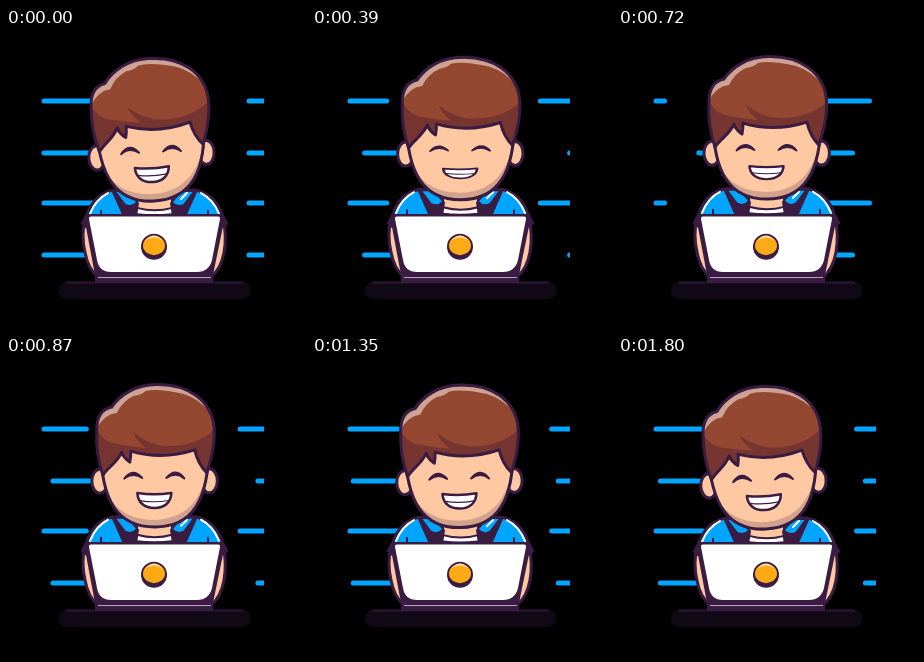
Write an HTML page that moves like this. It is 300 px wide and 300 px high and loops after 1.86 s.

```html
<!DOCTYPE html>
<html lang="en">
<head>
<meta charset="utf-8">
<title>Working at a laptop</title>
<style>
html, body { margin: 0; width: 100%; height: 100%; overflow: hidden; background: #000; }
svg { display: block; width: 100vw; height: 100vh; }
.ink { stroke: #3a1c42; stroke-width: 3; stroke-linejoin: round; stroke-linecap: round; }
.thin { stroke-width: 2; }
.bare { fill: none; }
.skin { fill: #fdc8a2; }
.shade { fill: #d2a28c; }
.blue { fill: #00a5ff; }
.dark { fill: #3a1c42; }
.shine { fill: none; stroke: #fff; stroke-width: 2; stroke-linecap: round; }
#lines path { fill: none; stroke: #00a5ff; stroke-width: 5; stroke-linecap: round; stroke-dasharray: 51.25; }
</style>
</head>
<body>
<svg viewBox="0 0 300 300">
  <defs>
    <path id="face" d="M95 90C95 145 112 171 149 171S203 145 203 90"/>
    <path id="hair" d="M97 119C93 107 90 92 91 74C91 61 96 53 106 51C114 39 130 28.500 151 28.500C182 28 206 44 208.500 72C209.500 89 205 104 201 117C195 111 191 103 189 94C167 101 145 101 125 95Q125 102 124 106Q118 102 116 96C111 107 103 110 97 119Z"/>
    <g id="collar">
      <path class="dark" d="M105 161L117 188H131L133 174L122 160Z"/>
      <path class="blue" d="M110.500 163L121 163L130 173Q126 178 119.500 175Z"/>
    </g>
    <path id="cuff" class="dark" d="M80 185L74.500 195L80 200L85 190Z"/>
    <clipPath id="stage"><rect width="258" height="300"/></clipPath>
    <clipPath id="faceClip"><use href="#face"/></clipPath>
    <clipPath id="hairClip"><use href="#hair"/></clipPath>
  </defs>

  <g id="lines" clip-path="url(#stage)">
    <path d="M38 73H300"/>
    <path d="M38 125H300"/>
    <path d="M38 175H300"/>
    <path d="M38 227H300"/>
  </g>

  <rect x="52.500" y="253.500" width="192" height="17.500" rx="8.700" fill="#110815"/>
  <path d="M60 254.500H237" stroke="#2b1434" stroke-width="2"/>

  <g id="body">
    <path class="ink skin" d="M79 190Q75 207 79 224Q82 241 92 249H205Q215 241 218 224Q221 207 217 190Z"/>
    <path class="ink blue" d="M79 194C82 177 90 165 107 161H190C207 165 215 177 218 194Z"/>
    <path class="shine" d="M84 185Q90 170 102 164M213 185Q207 170 195 164"/>
    <path class="ink thin bare" d="M95 187V182M202 187V182"/>
    <path fill="#fff" d="M126 170H171V192H126Z"/>
    <path class="ink thin bare" d="M131 185.500Q148 187.500 166 185.500"/>
    <path class="ink thin skin" d="M131 166H166V179Q149 184 131 179Z"/>
    <use href="#collar"/>
    <use href="#collar" transform="translate(297 0) scale(-1 1)"/>
    <path class="shine" d="M175 170L181 164"/>
    <use href="#cuff"/>
    <use href="#cuff" transform="translate(297 0) scale(-1 1)"/>
  </g>

  <g id="laptop">
    <path class="dark" d="M83 186H214Q219 186 218.500 191L207 247V255H89V247L78.500 191Q78 186 83 186Z"/>
    <path fill="#fff" d="M85 188.500H212Q214.500 188.500 214 191L206 232Q203 244 191 244H105Q93 244 91 232L83 191Q82.500 188.500 85 188.500Z"/>
    <path d="M92 249.500H205" stroke="#b9a2c0" stroke-width="1.200"/>
    <circle class="dark" cx="148" cy="218.700" r="13"/>
    <ellipse cx="148" cy="217.500" rx="11" ry="9.700" fill="#fdaa16"/>
    <path d="M139.500 212Q148 203 156.500 212Q148 207 139.500 212Z" fill="#ffe0a8"/>
  </g>

  <g id="head">
    <ellipse class="ink skin" cx="94" cy="125" rx="8" ry="12"/>
    <ellipse class="ink skin" cx="203.500" cy="125" rx="8" ry="12"/>
    <use href="#face" class="skin"/>
    <path class="shade" clip-path="url(#faceClip)" d="M203 105C198 143 181 163 149 164C126 164 112 155 104 142L112 174H204Z"/>
    <use href="#face" class="ink bare"/>

    <use href="#hair" fill="#944731"/>
    <g clip-path="url(#hairClip)">
      <path fill="#773531" d="M90 70Q96 86 112 88Q126 91 140 92Q132 86 127 76Q143 89 160 90Q190 91 209 74V122H90Z"/>
      <path fill="#cda394" d="M91 72V50H105L128 30H190L206 58Q194 43 178 38Q152 32 140 35Q136 39 128 40Q117 45 111 57Q99 58 91 72Z"/>
    </g>
    <use href="#hair" class="ink bare"/>

    <path id="eyes" class="ink thin dark" d="M118.500 122.500Q127 111 136.500 122Q127 115.500 118.500 122.500ZM160.500 122Q170 111 178.500 122.500Q170 115.500 160.500 122Z"/>
    <g id="mouth">
      <path class="ink" style="stroke-width: 2.500" fill="#fff" d="M131.500 137Q148.500 139.500 165.500 137C165 147 158 152 148.500 152C139 152 132 147 131.500 137Z"/>
      <path class="ink bare" style="stroke-width: 1.200" d="M134 144.500Q148.500 147 163 144.500"/>
    </g>
  </g>
</svg>
<script>
const STEP = 30, LOOP = 1860, LAST = 60;
const byId = id => document.getElementById(id);
const rows = document.querySelectorAll('#lines path');
const set = (id, value) => byId(id).setAttribute('transform', value);
const squash = (id, y, s) => set(id, `translate(0 ${y * (1 - s)}) scale(1 ${s})`);

function draw(ms) {
  const n = Math.min(LAST, Math.floor(ms % LOOP / STEP));

  // Alternate rows slide in opposite directions.
  rows.forEach((row, i) => {
    row.style.strokeDashoffset = n * 6.76 * (i % 2 ? 1 : -1);
  });

  // The head straightens quickly, then leans back.
  const lean = -3 * ((n - 20) / (n < 20 ? 20 : 40)) ** 2;
  const lift = Math.sin(Math.PI * n / LAST);
  set('head', `translate(0 ${2 * (1 - lift)}) rotate(${lean} 149 188)`);
  squash('body', 250, 1 + 0.015 * (lift - 0.8));

  const close = n < 30 ? (1 - Math.cos(Math.PI * n / 15)) / 2 : 0;
  squash('mouth', 145, 1 - 0.36 * close);
  squash('eyes', 121, 1 - 0.2 * close);
}

const start = performance.now();
function tick() {
  draw(performance.now() - start);
  requestAnimationFrame(tick);
}
draw(0);
tick();
</script>
</body>
</html>
```
